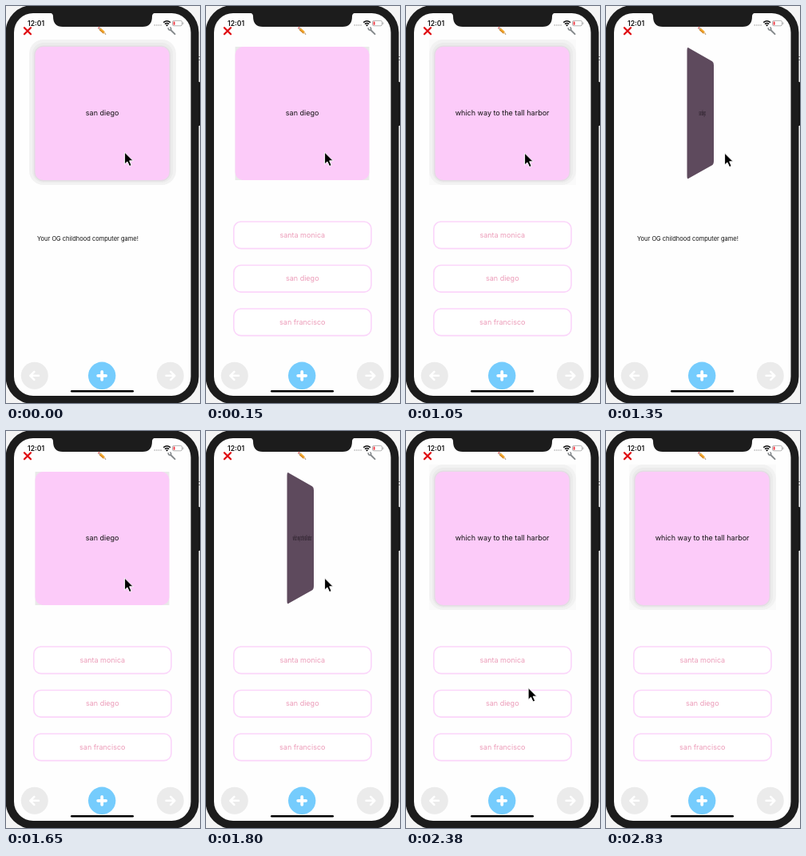
An HTML page that plays this animation: 243 px wide and 497 px high, repeating every 3580 ms.

```html
<!DOCTYPE html>
<html lang="en">
<head>
<meta charset="utf-8">
<title>Flashcards</title>
<style>
html, body { margin: 0; width: 100%; height: 100%; overflow: hidden; background: #f4f4f4; }
svg { display: block; width: 100vw; height: 100vh; }
text { font-family: Inter, Roboto, sans-serif; }
.mid { text-anchor: middle; }
</style>
</head>
<body>
<svg viewBox="0 0 243 497" preserveAspectRatio="none">
  <!-- phone -->
  <rect width="243" height="497" fill="#f4f4f4"/>
  <path d="M241 63.5h2M240.8 67.5h2.2" stroke="#777" stroke-width="1"/>
  <rect x="239" y="95" width="4" height="55" rx="1" fill="#111"/>
  <rect x="-.5" y="-1" width="242" height="499" rx="34" fill="#1c1c1c"/>
  <rect x="10" y="9" width="221.5" height="479" rx="24" fill="#fefefe"/>
  <path d="M55 8.5Q59 9 59 13Q59 26 71 26H171Q183 26 183 13Q183 9 187 8.5Z" fill="#1c1c1c"/>

  <!-- status bar -->
  <text x="27" y="24.8" font-size="8.6" font-weight="600" fill="#111">12:01</text>
  <path d="M185.5 24H195" stroke="#bbb" stroke-width="1.4" stroke-dasharray="1.6 1"/>
  <g fill="none" stroke="#111" stroke-width="1.5">
    <path d="M197.2 20.6Q201.6 16.8 206 20.6M199 22.6Q201.6 20.4 204.2 22.6"/>
  </g>
  <path d="M200 23.9Q201.6 22.8 203.2 23.9L201.6 25.4Z" fill="#111"/>
  <rect x="208.5" y="18.4" width="12" height="6.4" rx="1.8" fill="#fff" stroke="#aaa" stroke-width=".9"/>
  <rect x="209.6" y="19.5" width="2" height="4.2" rx=".6" fill="#f0404a"/>
  <path d="M221.9 20.4v2.4" stroke="#aaa"/>

  <!-- toolbar -->
  <path d="M23 27.2L31 35.2M31 27.2L23 35.2" stroke="#e00d12" stroke-width="2.3" stroke-linecap="round"/>
  <g transform="translate(115.6 26.6) rotate(43)">
    <rect x="0" y="-1.5" width="2.2" height="3" rx=".8" fill="#e58a86"/>
    <rect x="2" y="-1.5" width="1.4" height="3" fill="#a9a9a9"/>
    <rect x="3.2" y="-1.5" width="6.8" height="3" fill="#f3a92c"/>
    <path d="M3.2 .6H10V1.5H3.2Z" fill="#c97718"/>
    <path d="M10-1.5L13 0L10 1.5Z" fill="#e8c9a0"/>
    <path d="M12-.5L13.4 0L12 .5Z" fill="#333"/>
  </g>
  <g fill="none" stroke="#85898c" stroke-linecap="round">
    <path d="M206.3 30L211.5 35.1" stroke-width="2"/>
    <path d="M203.2 27.8Q203.4 30.4 205.8 30.2Q207.6 29 206 26.9" stroke-width="1.6"/>
  </g>

  <!-- card -->
  <rect id="haze" x="29" y="42" width="184" height="182" fill="#fafafa"/>
  <g id="glow">
    <rect x="29" y="42" width="184" height="182" rx="18" fill="#f2f2f2"/>
    <rect x="33" y="46" width="176" height="175" rx="14" fill="#ebebeb"/>
    <rect x="35" y="49.5" width="171" height="170" rx="12" fill="#e3dde3"/>
  </g>
  <rect id="corners" x="36.5" y="51" width="168" height="167" fill="#e9e9e9"/>
  <rect id="face" x="36.5" y="51" width="168" height="167" rx="10" fill="#fccbf9"/>
  <path id="edge" d="M101.5 56Q101.5 50.5 104 52.8L133 69.2Q135 70.4 135 74V194Q135 198 133 199.2L104 215.6Q101.5 218 101.5 212.5Z" fill="#5e4a5d"/>
  <text id="label" class="mid" y="3.2" font-size="9"></text>

  <!-- answers -->
  <text id="hint" x="39" y="293.8" font-size="7.5" fill="#111">Your OG childhood computer game!</text>
  <g id="options"></g>

  <!-- bottom bar -->
  <g id="bar">
    <circle cx="35.8" cy="462.8" r="17" fill="#ebebeb"/>
    <circle cx="120.2" cy="462.8" r="17.2" fill="#75ccfd"/>
    <circle cx="205.8" cy="462.8" r="17" fill="#ebebeb"/>
    <g fill="none" stroke="#fff" stroke-linecap="round" stroke-linejoin="round">
      <path d="M120.2 457.8v10M115.2 462.8h10" stroke-width="3.8"/>
      <path d="M41 462.8H30.5M35.3 457.8L30.3 462.8L35.3 467.8" stroke-width="2.6"/>
      <path d="M200.6 462.8H211.1M206.3 457.8L211.3 462.8L206.3 467.8" stroke-width="2.6"/>
    </g>
  </g>
  <rect x="81" y="481" width="79" height="2.6" rx="1.3" fill="#000"/>

  <path id="cursor" d="M.6 .5V15.4L4 12.3L6.6 18L9.2 16.8L6.7 11.2H11.3Z" fill="#000" stroke="#fff" stroke-width="1" stroke-linejoin="round"/>
</svg>
<script>
const LOOP = 3580;
const QUESTION = "which way to the tall harbor";
const ANSWER = "san diego";
const el = id => document.getElementById(id);

el("options").innerHTML = ["santa monica", "san diego", "san francisco"].map((name, i) => {
  const y = 270 + i * 54.5;
  return `<rect x="34.8" y="${y}" width="172.2" height="33.6" rx="9" fill="#fff" stroke="#fbd5fa" stroke-width="1.6"/>
    <text class="mid" x="120.8" y="${y + 19.8}" font-size="9" fill="#ec9bb8">${name}</text>`;
}).join("");

// [start, label, pose, options visible]
const cardSteps = [
  [0, ANSWER, "raised", false],
  [150, ANSWER, "flat", true],
  [300, QUESTION, "turning", true],
  [450, QUESTION, "raised", true],
  [1200, QUESTION, "flat", false],
  [1350, ANSWER, "turning", false],
  [1500, ANSWER, "flat", false],
  [1650, ANSWER, "flat", true],
  [1800, QUESTION, "turning", true],
  [1940, QUESTION, "raised", true]
];

// [start, x, y]
const cursorSteps = [
  [0, 148, 182.6], [1050, 148, 183.6], [2240, 146.5, 203.3],
  [2380, 152.5, 321], [2530, 159.5, 340], [2680, 160, 385], [2830, -40, 0]
];

const stepAt = (steps, t) => steps.filter(s => s[0] <= t).pop();
const show = (id, on) => el(id).setAttribute("visibility", on ? "visible" : "hidden");

function draw(t) {
  const [, label, pose, options] = stepAt(cardSteps, t);
  const [, x, y] = stepAt(cursorSteps, t);
  const turning = pose === "turning";
  const raised = pose === "raised";

  show("haze", raised && options);
  show("glow", raised);
  show("corners", pose === "flat");
  show("face", !turning);
  show("edge", turning);
  show("options", options);
  show("hint", !options);

  el("label").textContent = label;
  el("label").setAttribute("fill", turning ? "#1c141c" : "#111");
  el("label").setAttribute("transform", `translate(120.6 134) scale(${turning ? 0.2 : 1} 1)`);
  el("cursor").setAttribute("transform", `translate(${x} ${y})`);
}

const begin = performance.now();
function tick() {
  draw((performance.now() - begin) % LOOP);
  requestAnimationFrame(tick);
}
tick();
</script>
</body>
</html>
```
